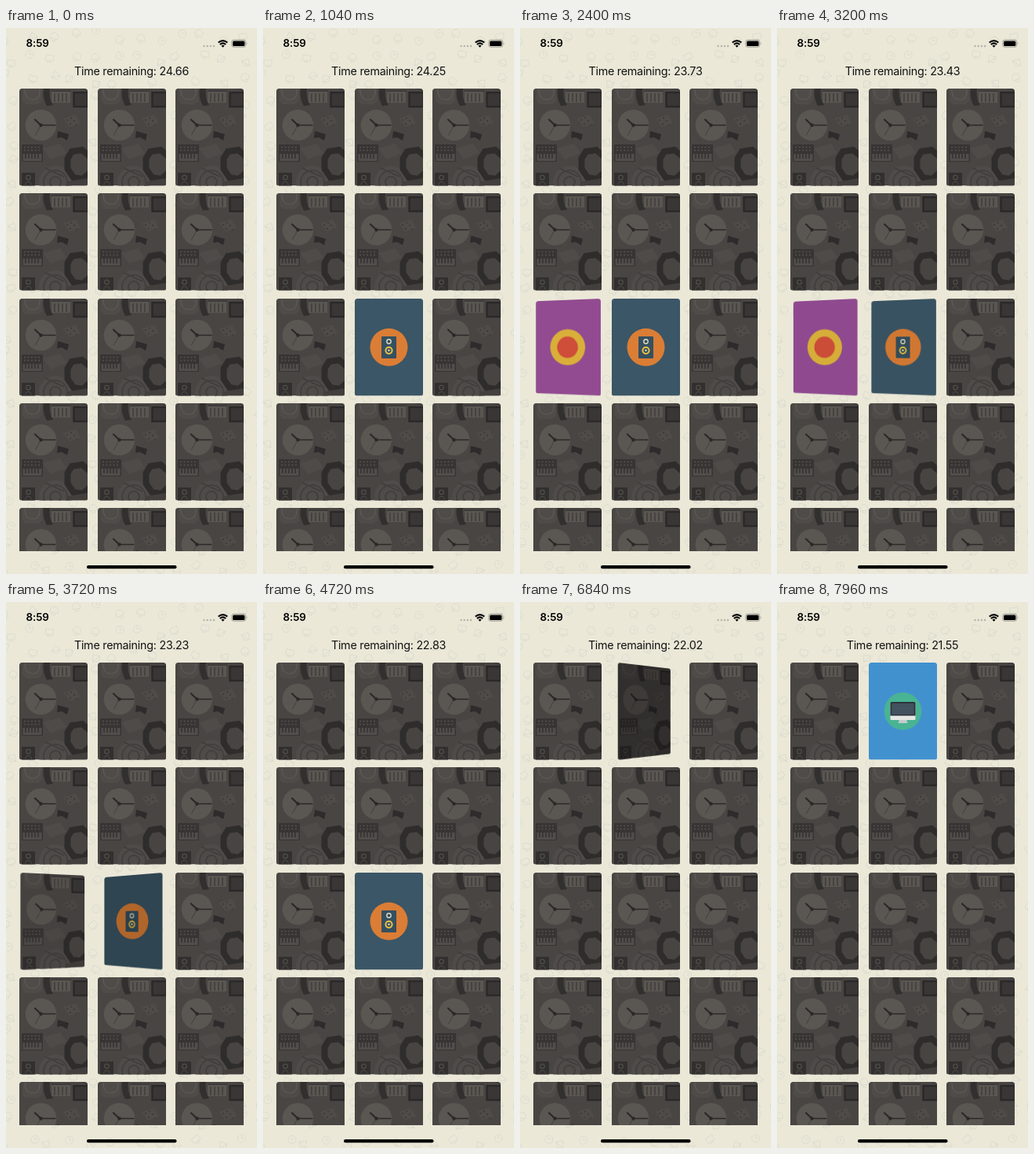
An HTML page for the animation above (8 s loop, 320x694 px).

```html
<!DOCTYPE html>
<html lang="en">
<head>
<meta charset="utf-8">
<title>Memory card game</title>
<style>
  html, body { margin: 0; width: 100%; height: 100%; overflow: hidden; background: #ebe8d8; }
  #stage { position: relative; width: 320px; height: 694px; overflow: hidden; background: #ebe8d8; }
  #stage > svg { position: absolute; left: 0; top: 0; }
  #grid { position: absolute; width: 320px; height: 665px; overflow: hidden; }
  .card { position: absolute; width: 87px; height: 123.5px; border-radius: 3.5px; overflow: hidden; }
  .card svg { display: block; }
  .shade { position: absolute; inset: 0; background: #000; opacity: 0; }
  #timer { position: absolute; top: 45px; width: 320px; text-align: center; white-space: nowrap;
    font: 14.3px/20px Inter, Roboto, sans-serif; letter-spacing: -.24px; color: #111; }
</style>
</head>
<body>
<div id="stage">
  <svg width="320" height="694">
    <g id="doodles" fill="none" stroke="#dadacd" stroke-width=".8"></g>
    <text x="25.6" y="24.4" font-family="Inter, Roboto, sans-serif" font-size="13.4" font-weight="600" letter-spacing="-.1">8:59</text>
    <g fill="#b5b3a7">
      <circle cx="252.5" cy="23" r="1.2"/><circle cx="256.7" cy="23" r="1.2"/>
      <circle cx="260.9" cy="23" r="1.2"/><circle cx="265.1" cy="23" r="1.2"/>
    </g>
    <g fill="none" stroke="#000" stroke-width="2">
      <path d="M270.7 18.6Q276.5 13.6 282.3 18.6M272.8 21Q276.5 17.8 280.2 21"/>
    </g>
    <path d="M274.4 22.6Q276.5 21 278.6 22.6L276.5 24.8Z"/>
    <rect x="287.7" y="15.2" width="18" height="9" rx="2.6" fill="none" stroke="#8b897f" stroke-width=".8"/>
    <rect x="289" y="16.5" width="15.4" height="6.4" rx="1.5"/>
    <path d="M306.8 18.2q1.6 1.5 0 3z" fill="#8b897f"/>
    <rect x="103" y="683" width="114.5" height="4.3" rx="2.1"/>
  </svg>
  <div id="timer"></div>
  <div id="grid"></div>
</div>

<svg width="0" height="0" style="position:absolute">
  <symbol id="back" viewBox="0 0 87 123.5">
    <rect width="87" height="123.5" fill="#494543"/>
    <g fill="#4f4b48">
      <path d="M4 0H29V16L24 20H8L4 16Z"/>
      <path d="M56 38L72 33L78 44L64 49Z"/>
      <path d="M30 76L52 70L60 82L40 90Z"/>
      <circle cx="46" cy="119" r="21"/>
    </g>
    <path d="M7 1Q7 14 17 14T26 1" fill="none" stroke="#5e5a55" stroke-width="1.2"/>
    <path d="M31 0H39Q37 11 43 21L35 22Q29 11 31 0Z" fill="#322f2f"/>
    <rect x="41" y="4" width="24" height="14" fill="#5a5651"/>
    <path d="M45 6V17M50 6V17M55 6V17M60 6V17" stroke="#454140" stroke-width="1.8"/>
    <path d="M41 3H66" stroke="#3b3737" stroke-width="1.6"/>
    <rect x="69.5" y="5" width="18" height="18" fill="#3a3636" stroke="#2b2829" stroke-width="2.4"/>
    <circle cx="27.5" cy="46.5" r="19.8" fill="#5a5651"/>
    <g stroke="#2b2829" stroke-linecap="round">
      <path d="M27.5 46.5L20 39.5" stroke-width="2.2"/>
      <path d="M27.5 46.5H46" stroke-width="1.5"/>
      <path d="M27.5 46.5L20.5 59" stroke-width=".5"/>
    </g>
    <circle cx="27.5" cy="46.5" r="2.2" fill="#2b2829"/>
    <g fill="#383434">
      <circle cx="61" cy="40" r=".9"/><circle cx="66" cy="37.5" r=".9"/><circle cx="70" cy="41" r=".9"/>
      <circle cx="65" cy="45" r=".9"/><circle cx="73" cy="46" r=".8"/>
    </g>
    <path d="M49 54L63 58L61 66L54 62L48 63Z" fill="#2e2b2c"/>
    <path d="M78 0L87 3V2L80 0" fill="#3a3636"/>
    <rect x="3" y="71" width="27" height="22" rx="1" fill="#383434"/>
    <path d="M6 74.5H27M6 78.5H27" stroke="#55514d" stroke-width="1.3" stroke-dasharray="2 2.5"/>
    <rect x="4.5" y="83" width="24" height="9" fill="#514d4a"/>
    <path d="M8 83V89M12 83V89M16 83V89M20 83V89M24 83V89" stroke="#353132" stroke-width="1.5"/>
    <path d="M67 80L80 78L92 88L92 105L81 115L69 113L61.5 102L61.5 89Z" fill="#484442" stroke="#2f2c2c" stroke-width="8"/>
    <path d="M33 101L57 112" stroke="#403c3b" stroke-width="1.6"/>
    <g fill="none" stroke="#433f3e" stroke-width="2">
      <circle cx="46" cy="119" r="15"/><circle cx="46" cy="119" r="7"/>
    </g>
    <path d="M62 118L87 114V123.5H60Z" fill="#433f3d"/>
    <rect x="3" y="107" width="17" height="17" fill="#322f2f"/>
    <circle cx="11.5" cy="113" r="2.8" fill="none" stroke="#55514d" stroke-width="1.1"/>
    <circle cx="11.5" cy="122" r="3.6" fill="none" stroke="#4a4643" stroke-width="1.1"/>
  </symbol>

  <symbol id="speaker" viewBox="0 0 87 123.5">
    <rect width="87" height="123.5" fill="#3b5666"/>
    <circle cx="43.5" cy="61.8" r="24" fill="#db7d35"/>
    <rect x="34" y="48" width="19" height="28" rx="1" fill="#35505f"/>
    <circle cx="43.5" cy="54.5" r="2.7" fill="#35505f" stroke="#ddd9c4" stroke-width="1.4"/>
    <circle cx="43.5" cy="65.8" r="4.1" fill="#35505f" stroke="#e8c043" stroke-width="2"/>
    <circle cx="43.5" cy="65.8" r="1.2" fill="#e5dcbc"/>
  </symbol>

  <symbol id="badge" viewBox="0 0 87 123.5">
    <rect width="87" height="123.5" fill="#994f98"/>
    <circle cx="43.5" cy="61.8" r="23.5" fill="#e4b83c"/>
    <circle cx="43.5" cy="61.8" r="14" fill="#d8523c"/>
  </symbol>

  <symbol id="person" viewBox="0 0 87 123.5">
    <rect width="87" height="123.5" fill="#65386f"/>
    <circle cx="43.5" cy="61.8" r="23.8" fill="#e1583f"/>
    <path d="M30 81Q31 71 39 71H48Q56 71 57.5 81Q44 90 30 81Z" fill="#f0cf49"/>
    <path d="M39 68H48V72Q43.5 76 39 72Z" fill="#dd8e75"/>
    <rect x="34" y="50" width="19" height="21" rx="8.5" fill="#eda48a"/>
    <path d="M33 58Q32 47 43 47Q54 47 54 58L50 53Q42 56 37 53Z" fill="#71391f"/>
    <g fill="#f4e6d8" stroke="#8a8a8a" stroke-width=".9"><circle cx="39.5" cy="60" r="2.6"/><circle cx="47.5" cy="60" r="2.6"/></g>
    <circle cx="39.7" cy="60" r=".9"/><circle cx="47.3" cy="60" r=".9"/>
    <path d="M41 67H46" stroke="#b34f43"/>
    <circle cx="49.5" cy="77" r="1.7" fill="#4a5a78"/>
  </symbol>

  <symbol id="monitor" viewBox="0 0 87 123.5">
    <rect width="87" height="123.5" fill="#4291cf"/>
    <circle cx="43.5" cy="61.8" r="23.8" fill="#48b493"/>
    <path d="M39 72H48L49.5 77H37.5Z" fill="#c3cbcb"/>
    <rect x="27.5" y="50" width="32" height="23" rx="1.5" fill="#e5e7e5"/>
    <path d="M27.5 67.5V51.5Q27.5 50 29 50H58Q59.5 50 59.5 51.5V67.5Z" fill="#282d35"/>
    <rect x="29.2" y="51.7" width="28.6" height="14.3" fill="#43525f"/>
  </symbol>
</svg>

<script>
const LOOP = 8000, STEP = 40;
const grid = document.getElementById('grid');
const timer = document.getElementById('timer');

// Each track lists [time, angle]; 0 is face down, 180 is face up.
const tracks = {
  '1,2': { face: 'speaker', keys: [[190, 0], [990, 180], [3080, 180], [3440, 130], [4020, 180], [6000, 180], [6800, 0]] },
  '0,2': { face: 'badge', keys: [[1730, 0], [2530, 180], [3060, 180], [3860, 0]] },
  '1,1': { face: 'person', keys: [[4800, 0], [5600, 180], [6000, 180], [6800, 0]] },
  '1,0': { face: 'monitor', keys: [[6615, 0], [7415, 180]] }
};
const clock = [[0, 24.66], [1040, 24.25], [2400, 23.73], [3720, 23.23], [5720, 22.42], [6840, 22.02], [7960, 21.55]];

const linear = p => p;
const smooth = p => p * p * (3 - 2 * p);

function valueAt(keys, t, ease) {
  const next = keys.findIndex(key => key[0] > t);
  if (next === 0) return keys[0][1];
  if (next < 0) return keys[keys.length - 1][1];
  const [t0, v0] = keys[next - 1], [t1, v1] = keys[next];
  return v0 + (v1 - v0) * ease((t - t0) / (t1 - t0));
}

function addCard(column, row) {
  const card = document.createElement('div');
  card.className = 'card';
  card.style.left = Math.round(17 + column * 99.6) + 'px';
  card.style.top = Math.round(77 + row * 133.35) + 'px';
  card.innerHTML = '<svg width="87" height="123.5"><use href="#back"/></svg><div class="shade"></div>';
  grid.append(card);
  const track = tracks[[column, row]];
  if (track) Object.assign(track, { card, use: card.querySelector('use'), shade: card.lastChild });
}

// The card sinks while turning, so that its near edge stays in the stage plane.
function pose({ face, keys, card, use, shade }, t) {
  const angle = valueAt(keys, t, smooth);
  const turn = angle > 90 ? angle - 180 : angle;
  const tilt = Math.abs(Math.sin(turn * Math.PI / 180));
  use.setAttribute('href', angle > 90 ? '#' + face : '#back');
  card.style.transform = turn
    ? `perspective(350px) translateZ(${-43.5 * tilt}px) rotateY(${turn}deg)` : 'none';
  shade.style.opacity = tilt * tilt;
}

function drawDoodles() {
  let seed = 7;
  const random = () => (seed = seed * 16807 % 2147483647) / 2147483647;
  const shapes = ['M-5-3H5V4H-5ZM-2 4V6H2V4', 'M-5 0A5 5 0 1 0 5 0A5 5 0 1 0-5 0M0-3V0H3',
    'M-5 3Q-6-4 0-5Q6-4 5 3ZM-2 3V6H2V3', 'M-6 2L0-5L6 2L0 6ZM-6 2H6'];
  let markup = '';
  for (let y = 10; y < 694; y += 27)
    for (let x = 4; x < 330; x += 27) {
      const place = `${x + random() * 14 - 7} ${y + random() * 16 - 8}`;
      markup += `<path transform="translate(${place}) rotate(${random() * 80 - 40})" d="${shapes[random() * 4 | 0]}"/>`;
    }
  document.getElementById('doodles').innerHTML = markup;
}

function frame() {
  const t = Math.floor(performance.now() % LOOP / STEP) * STEP;
  timer.textContent = 'Time remaining: ' + valueAt(clock, t, linear).toFixed(2);
  for (const key in tracks) pose(tracks[key], t);
  requestAnimationFrame(frame);
}

for (let row = 0; row < 5; row++)
  for (let column = 0; column < 3; column++) addCard(column, row);
drawDoodles();
frame();
</script>
</body>
</html>
```
